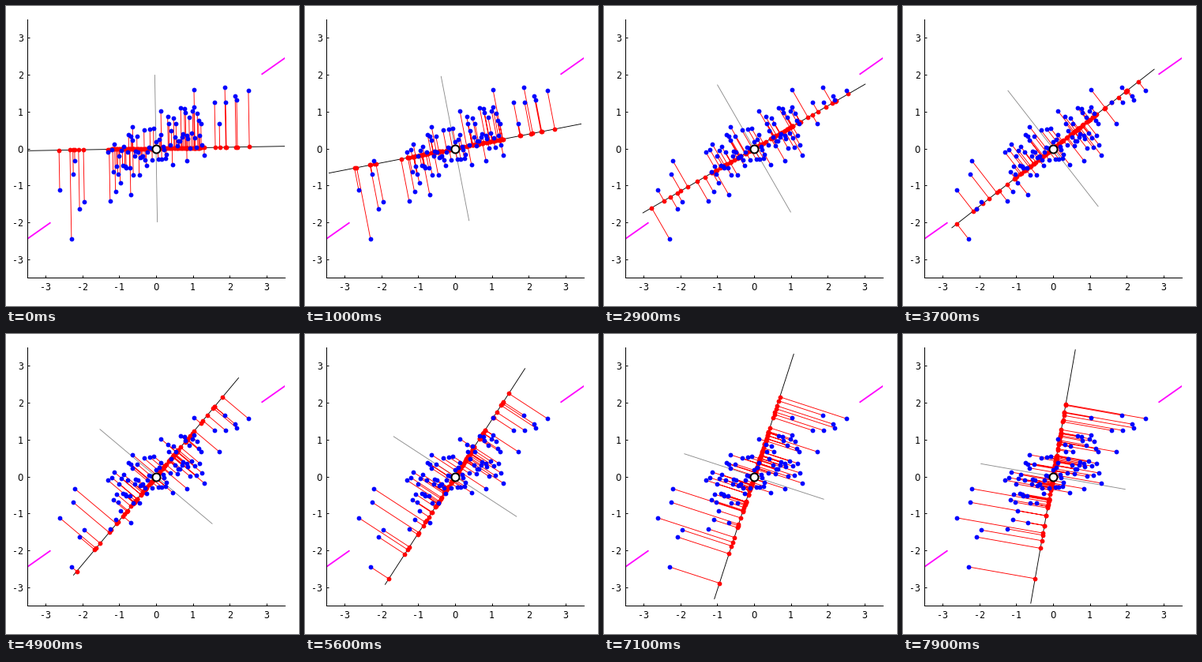
Animation, 371 px wide and 380 px high, one loop 8000 ms. Source, as a matplotlib script:

```python
import numpy as np
import matplotlib.pyplot as plt
from matplotlib.animation import FuncAnimation

W, H, DPI = 371, 380, 100
LEFT, RIGHT, TOP, BOTTOM = 27, 353, 17, 344
LIM = 3.5
PX = 72 / DPI  # one pixel in points
THIN = 0.9

plt.rcParams.update({
    "font.family": "DejaVu Sans Mono",
    "font.size": 8.4,
    "axes.unicode_minus": False,
})

# Points on the rim of the cloud; the core is random around a slope.
RIM = [
    (-2.62, -1.12), (-2.30, -2.45), (-2.25, -0.70), (-2.21, -0.33),
    (-2.08, -1.64), (-1.95, -1.45), (-1.31, -0.10), (-1.25, -1.42),
    (-0.69, -1.25), (-0.64, 0.59), (0.13, 1.02), (0.84, -0.33),
    (1.03, 1.60), (1.31, -0.18), (1.59, 1.25), (1.72, 0.67),
    (1.87, 1.66), (1.89, 1.25), (2.15, 1.42), (2.19, 1.32), (2.51, 1.57),
]


def cloud(count=77, slope=0.55, spread=0.95):
    rng = np.random.default_rng(4)
    x = np.linspace(-1.2, 1.25, count)
    y = slope * x + rng.triangular(-spread, 0, spread, count)
    return np.vstack([RIM, np.column_stack([x, y])])


def direction(degrees):
    a = np.radians(degrees)
    return np.array([np.cos(a), np.sin(a)])


points = cloud()

fig = plt.figure(figsize=(W / DPI, H / DPI), dpi=DPI, facecolor="white")
ax = fig.add_axes([LEFT / W, 1 - BOTTOM / H,
                   (RIGHT - LEFT) / W, (BOTTOM - TOP) / H])
ax.set(xlim=(-LIM, LIM), ylim=(-LIM, LIM))
ticks = range(-3, 4)
ax.set_xticks(ticks, [str(t) for t in ticks])
ax.set_yticks(ticks, [str(t) for t in ticks])
ax.tick_params(direction="in", length=3 * PX, width=PX)
ax.tick_params(axis="x", pad=6 * PX)
ax.tick_params(axis="y", pad=5 * PX)
for label in (ax.get_xticklabels()[3], ax.get_yticklabels()[3]):
    label.set_family("DejaVu Sans")  # plain zero
ax.spines[["top", "right"]].set_visible(False)
ax.spines[["left", "bottom"]].set_linewidth(PX)


def line(color, width, z):
    return ax.plot([], [], color=color, lw=width * PX, zorder=z,
                   solid_capstyle="butt")[0]


def dots(color, z):
    return ax.plot([], [], "o", color=color, ms=5.8 * PX, mew=0, zorder=z)[0]


def span(artist, start, end, u):
    artist.set_data(*np.outer([start, end], u).T)


normal = line("0.55", THIN, 2)
axis = line("black", THIN, 3)
links = line("red", THIN, 4)
feet = dots("red", 5)
dots("blue", 6).set_data(*points.T)
ax.plot(0, 0, "o", mfc="white", mec="black", ms=10 * PX, mew=2 * PX, zorder=7)

for side in (-1, 1):
    span(line("magenta", 1.8, 2), LIM, 4.5, side * direction(35))


def update(frame):
    angle = frame + 1
    u = direction(angle)
    span(axis, -LIM, LIM, u)
    span(normal, -2, 2, direction(angle + 90))
    foot = np.outer(points @ u, u)
    gap = np.full_like(foot, np.nan)
    links.set_data(*np.stack([points, foot, gap], axis=1).reshape(-1, 2).T)
    feet.set_data(*foot.T)
    return normal, axis, links, feet


anim = FuncAnimation(fig, update, frames=80, interval=100,
                     repeat=True, repeat_delay=0)
plt.show()
```
